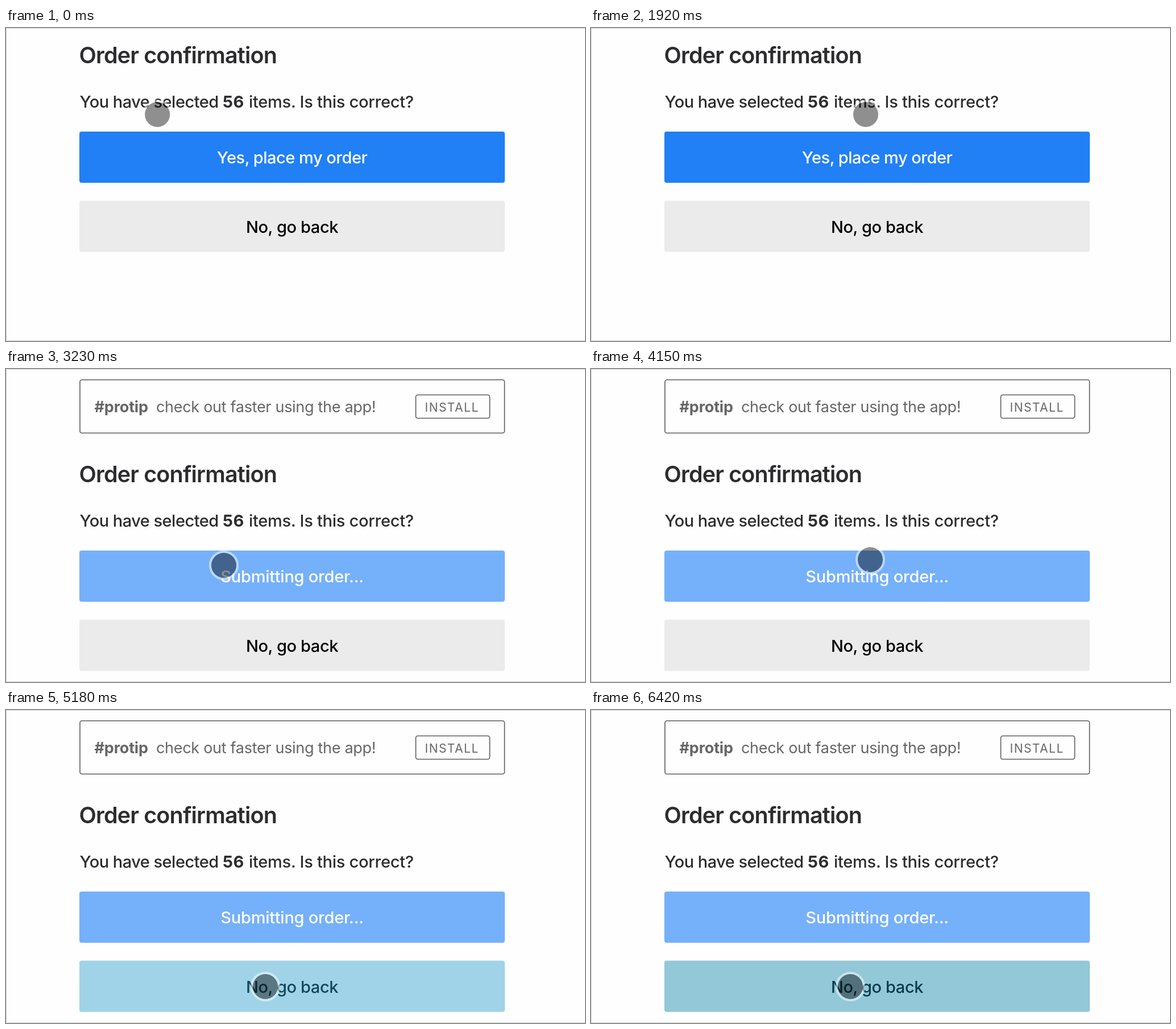
An HTML page for the animation above (6490 ms loop, 1018 by 550 pixels).

```html
<!DOCTYPE html>
<html lang="en">
<head>
<meta charset="utf-8">
<title>Order confirmation</title>
<style>
  html, body { margin: 0; width: 100%; height: 100%; overflow: hidden; background: #fff; }
  svg { display: block; width: 100vw; height: 100vh; font-family: Inter, Roboto, sans-serif; font-size: 29px; font-weight: 450; }
  .ink { fill: #2d2d2f; }
  .mid { text-anchor: middle; }
  .tip { font-size: 27px; fill: #666; }
  .line { fill: none; stroke: #5c5c5c; stroke-width: 1.6; }
</style>
</head>
<body>
<svg viewBox="0 0 1018 550">
  <rect width="1018" height="550" fill="#fefefe"/>

  <g id="banner">
    <rect class="line" x="130" y="19" width="746.5" height="93.5" rx="3.5"/>
    <text class="tip" x="155.5" y="76" font-weight="700" letter-spacing="-.2">#protip</text>
    <text class="tip" x="264" y="76" font-weight="400" letter-spacing="-.3">check out faster using the app!</text>
    <rect class="line" x="720.5" y="45.5" width="130" height="41" rx="3.5"/>
    <text class="tip" x="736.5" y="75" font-weight="400" style="font-size:21px" letter-spacing="1.5">INSTALL</text>
  </g>

  <g id="page">
    <text class="ink" x="128.5" y="62" font-size="39.5" font-weight="570" letter-spacing="-.85">Order confirmation</text>
    <g class="ink">
      <text x="129.5" y="139.5" letter-spacing="-.52">You have selected</text>
      <text x="381" y="139.5" font-weight="700" letter-spacing=".5">56</text>
      <text x="427" y="139.5" letter-spacing="-.28">items. Is this correct?</text>
    </g>
    <rect id="yes" x="129" y="182" width="748" height="90" rx="4"/>
    <text id="yesText" class="mid" x="503" y="238" fill="#fff"></text>
    <rect x="129" y="303.5" width="748" height="90" rx="4" fill="#ebebeb"/>
    <text class="mid" x="503" y="359.5" letter-spacing="-.4">No, go back</text>
    <rect id="glow" x="129" y="303.5" width="748" height="90" rx="4" fill-opacity=".4"/>
  </g>

  <g id="touch">
    <circle id="ring" r="24" fill="none" stroke="#fff" stroke-opacity=".5" stroke-width="4"/>
    <circle id="dot" r="22" fill="#000" fill-opacity=".44"/>
    <circle id="press" r="26" fill="#6e6e6e" fill-opacity=".45" stroke="#6e6e6e" stroke-opacity=".25"/>
  </g>

  <path d="M1018 .5H.5V549.5H1018" fill="none" stroke="#cfcfcf"/>
</svg>
<script>
const LOOP = 6490;
const BANNER_AT = 2930, SUBMIT_AT = 3200, GLOW_AT = 5010;
const TAPS = [3010, 4930, 5560, 6230];

// time, x, y
const PATH = [
  [0, 266, 152], [500, 345, 143], [990, 427, 132], [1380, 428, 138],
  [1620, 483, 152], [1920, 483, 152], [2550, 383, 345], [3420, 383, 345],
  [4070, 491, 335], [4150, 491, 335], [4700, 459, 480], [4880, 456, 486], [LOOP, 456, 486]
];

const $ = id => document.getElementById(id);
const set = (id, name, value) => $(id).setAttribute(name, value);
const clamp = v => Math.max(0, Math.min(1, v));
const ramp = (t, a, b) => clamp((t - a) / (b - a));
const mix = (a, b, k) => a + (b - a) * k;
const same = (p, q) => p[1] === q[1] && p[2] === q[2];

// Speed at a path point, zero next to a rest
function slope(i, axis) {
  const p = PATH[i], a = PATH[i - 1] || p, b = PATH[i + 1] || p;
  if ((a !== p && same(a, p)) || (b !== p && same(b, p))) return 0;
  return (b[axis] - a[axis]) / (b[0] - a[0]);
}

function position(t) {
  let i = 0;
  while (i < PATH.length - 2 && t >= PATH[i + 1][0]) i++;
  const a = PATH[i], b = PATH[i + 1], d = b[0] - a[0], u = (t - a[0]) / d;
  const v = 1 - u;
  return [1, 2].map(k =>
    a[k] * (1 + 2 * u) * v * v + b[k] * u * u * (3 - 2 * u) +
    d * u * v * (slope(i, k) * v - slope(i + 1, k) * u));
}

const pressure = t => Math.max(...TAPS.map(s =>
  ramp(t, s, s + 60) * (1 - ramp(t, s + 120, s + 190))));

function glowColor(t) {
  const [first, second, third] = [[48, 175, 228], [58, 152, 195], [13, 148, 188]];
  const a = ramp(t, 5480, 5600), b = ramp(t, 5700, 6170);
  return `rgb(${first.map((c, i) => Math.round(mix(mix(c, second[i], a), third[i], b)))})`;
}

function draw(t) {
  const shifted = t >= BANNER_AT, sent = t >= SUBMIT_AT;
  set("banner", "visibility", shifted ? "visible" : "hidden");
  set("page", "transform", `translate(0 ${shifted ? 137 : 0})`);
  set("yes", "fill", sent ? "#75b0fa" : "#2180f5");
  set("yesText", "letter-spacing", sent ? -.25 : -.5);
  $("yesText").textContent = sent ? "Submitting order..." : "Yes, place my order";

  set("glow", "fill", glowColor(t));
  set("glow", "visibility", t >= GLOW_AT ? "visible" : "hidden");

  const p = pressure(t);
  set("touch", "transform", `translate(${position(t).map(v => v.toFixed(2)).join(" ")})`);
  set("ring", "opacity", 1 - p);
  set("dot", "opacity", 1 - p);
  set("press", "opacity", p);
}

const start = performance.now();
function tick() {
  draw((performance.now() - start) % LOOP);
  requestAnimationFrame(tick);
}
tick();
</script>
</body>
</html>
```
